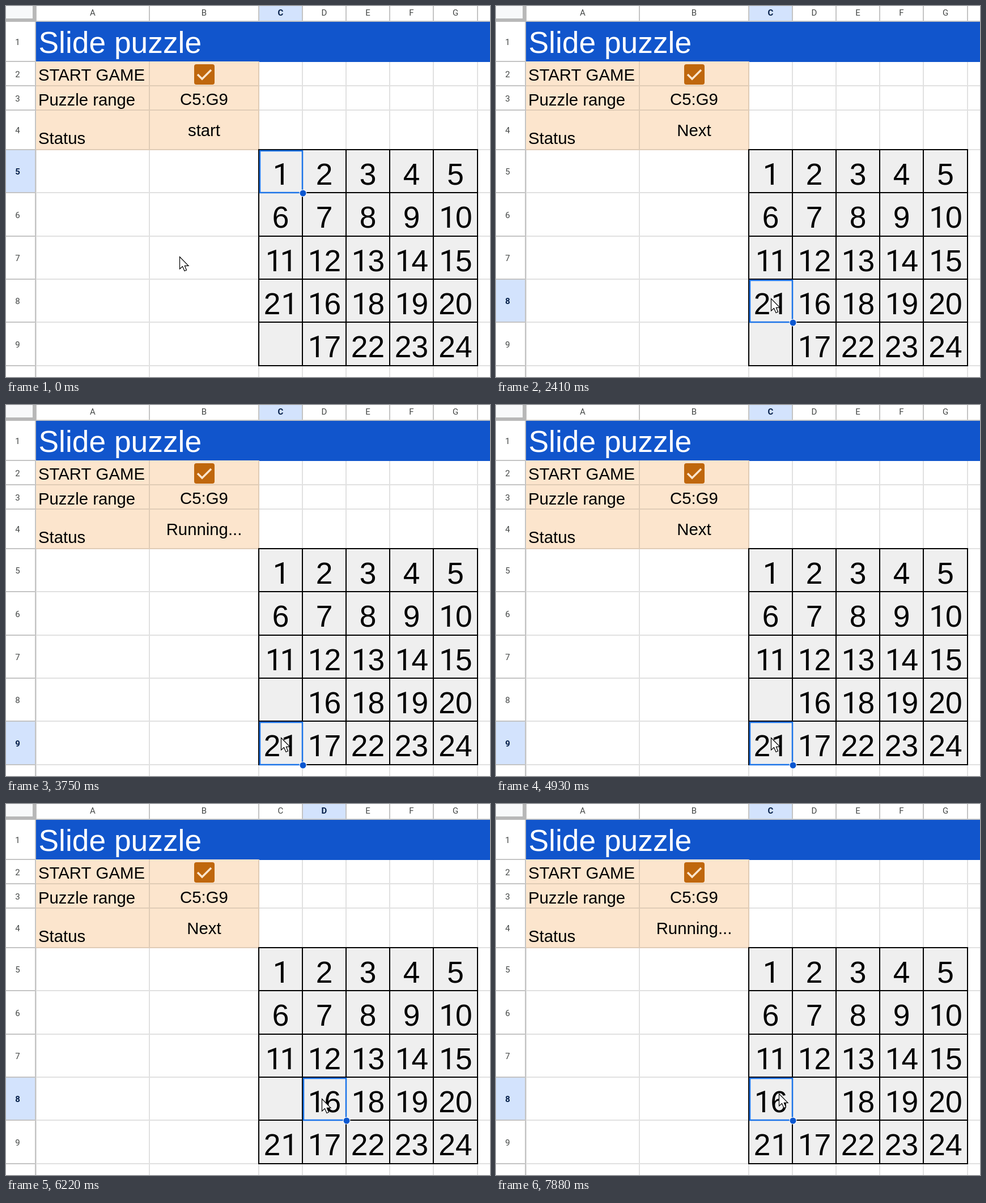
Recreate the animation shown at these times as an HTML page with a canvas. Size 854 px wide and 656 px high, loop 8 s.

```html
<!DOCTYPE html>
<html lang="en">
<head>
<meta charset="utf-8">
<title>Slide puzzle</title>
<style>
  html, body { margin: 0; width: 100%; height: 100%; overflow: hidden; background: #fff; }
  canvas { display: block; }
</style>
</head>
<body>
<canvas width="854" height="656"></canvas>
<script>
const ctx = document.querySelector('canvas').getContext('2d');
const W = 854, H = 656, LOOP = 8000, TICK = 67;
const SANS = '"Liberation Sans", Arial, sans-serif';
const HEAD = 'Roboto, sans-serif';
const colX = [53, 253, 446, 523, 600, 677, 754, 832];
const rowY = [27, 98, 141, 184, 254, 330, 407, 483, 559, 636];
const TILE_COL = 2, TILE_ROW = 4;

const board = [1, 2, 3, 4, 5, 6, 7, 8, 9, 10, 11, 12, 13, 14, 15, 21, 16, 18, 19, 20, 0, 17, 22, 23, 24];
const swaps = [{ at: 3750, a: 15, b: 20 }, { at: 7880, a: 15, b: 16 }];

// Each move ends with a click that selects a cell; the fill handle returns on release.
const home = { x: 306, y: 443, col: 2, row: 4 };
const moves = [
  { start: 130, press: 760, release: 930, x: 485, y: 517, col: 2, row: 7 },
  { start: 2410, press: 2745, release: 2890, x: 485, y: 588, col: 2, row: 8 },
  { start: 4870, press: 5330, release: 5470, x: 557, y: 521, col: 3, row: 7 },
  { start: 6620, press: 6880, release: 7020, x: 499, y: 512, col: 2, row: 7 },
];
const statuses = [
  [0, 'start'], [1880, 'Running...'], [2080, 'Next'], [3220, 'Running...'],
  [4210, 'Next'], [5820, 'Running...'], [6220, 'Next'], [7680, 'Running...'],
];

function rect(color, x1, y1, x2, y2) {
  ctx.fillStyle = color;
  ctx.fillRect(x1, y1, x2 - x1, y2 - y1);
}
const vLine = (color, x, y1, y2) => rect(color, x - 1, y1, x + 1, y2);
const hLine = (color, y, x1, x2) => rect(color, x1, y - 1, x2, y + 1);

function text(str, x, y, font, color = '#000', align = 'left') {
  ctx.font = font;
  ctx.fillStyle = color;
  ctx.textAlign = align;
  ctx.fillText(str, x, y);
}

function disc(color, x, y, r) {
  ctx.fillStyle = color;
  ctx.beginPath();
  ctx.arc(x, y, r, 0, Math.PI * 2);
  ctx.fill();
}

function polyline(points) {
  ctx.beginPath();
  points.forEach(([x, y]) => ctx.lineTo(x, y));
}

function sceneAt(t) {
  const scene = { ...home, handle: true, click: false };
  for (const m of moves) {
    if (t < m.start) break;
    const elapsed = Math.floor((t - m.start) / TICK) * TICK;
    const p = t >= m.press ? 1 : Math.min(1, elapsed / (m.press - m.start));
    const ease = p * p * (3 - 2 * p);
    scene.x += (m.x - scene.x) * ease;
    scene.y += (m.y - scene.y) * ease;
    if (t >= m.press) {
      scene.col = m.col;
      scene.row = m.row;
      scene.click = t < m.release;
      scene.handle = !scene.click;
    }
  }
  scene.status = statuses.findLast(([at]) => t >= at)[1];
  scene.tiles = [...board];
  for (const { at, a, b } of swaps) {
    if (t >= at) [scene.tiles[a], scene.tiles[b]] = [scene.tiles[b], scene.tiles[a]];
  }
  return scene;
}

function drawHeaders({ col, row }) {
  const grey = '#c4c4c4', active = '#d3e3fd';
  rect(active, colX[col], 0, colX[col + 1], 27);
  rect(active, 0, rowY[row], 52, rowY[row + 1]);
  colX.forEach(x => vLine(grey, x, 0, 27));
  hLine(grey, 27, 0, W);
  vLine(grey, 52, 0, H);
  rowY.forEach(y => hLine(grey, y, 0, 52));
  const label = (str, x, y, on) =>
    text(str, x, y, `${on ? 'bold ' : ''}15px ${HEAD}`, on ? '#041e49' : '#444746', 'center');
  [...'ABCDEFG'].forEach((c, i) => label(c, (colX[i] + colX[i + 1]) / 2, 17, i === col));
  for (let i = 0; i < 9; i++) label(i + 1, 20.5, (rowY[i] + rowY[i + 1]) / 2 + 6, i === row);
  rect('#b8b8b8', 0, 0, 53, 28);
  rect('#f8f9fa', 0, 0, 47, 22);
}

function drawSheet(scene) {
  rect('#fff', 0, 0, W, H);
  colX.forEach(x => vLine('#e1e1e1', x, 28, H));
  rowY.forEach(y => hLine('#e1e1e1', y, 53, W));
  drawHeaders(scene);

  rect('#1155cc', 53, 28, W, 99);
  text('Slide puzzle', 57.5, 83, `53.33px ${SANS}`, '#fff');

  rect('#fce5cd', 53, 98, 447, 255);
  rowY.slice(2, 5).forEach(y => hLine('#e0ccb6', y, 53, 447));
  [253, 446].forEach(x => vLine('#e0ccb6', x, 98, 255));
  const font = `29.33px ${SANS}`;
  text('START GAME', 57, 132, font);
  text('Puzzle range', 57, 176, font);
  text('Status', 57, 244, font);
  text('C5:G9', 349.5, 175, font, '#000', 'center');
  text(scene.status, 349.5, 230, font, '#000', 'center');

  ctx.fillStyle = '#bf670d';
  ctx.beginPath();
  ctx.roundRect(332, 103, 36, 36, 4);
  ctx.fill();
  polyline([[338, 121], [346, 129], [362, 113]]);
  ctx.strokeStyle = '#fce5cd';
  ctx.lineWidth = 3.5;
  ctx.stroke();
}

// The digit 1 is set in a face without a foot serif, and a pair of them is kerned.
function drawNumber(n, cx, baseline) {
  const size = 53.33, step = size * (n === 11 ? 0.482 : 0.556);
  const digits = [...String(n)];
  const left = cx - (step * (digits.length - 1) + size * 0.556) / 2;
  digits.forEach((d, i) => {
    const x = left + i * step;
    if (d === '1') text(d, x + 1, baseline, `${size}px ${HEAD}`);
    else text(d, x, baseline, `${size}px ${SANS}`);
  });
}

function drawBoard(tiles) {
  rect('#efefef', 446, 254, 832, 636);
  colX.slice(TILE_COL).forEach(x => vLine('#000', x, 253, 637));
  rowY.slice(TILE_ROW).forEach(y => hLine('#000', y, 445, 833));
  tiles.forEach((n, i) => {
    const c = TILE_COL + i % 5, r = TILE_ROW + Math.floor(i / 5);
    if (n) drawNumber(n, (colX[c] + colX[c + 1]) / 2, rowY[r] + 62);
  });
}

function drawSelection({ col, row, handle }) {
  const x = colX[col], y = rowY[row];
  const right = colX[col + 1], bottom = rowY[row + 1];
  ctx.strokeStyle = '#1a73e8';
  ctx.lineWidth = handle ? 2.5 : 2;
  ctx.strokeRect(x + 2, y + 2, right - x - 2, bottom - y - 2);
  if (handle) {
    disc('#fff', right + 1, bottom + 1, 6.5);
    disc('#0b57d0', right + 1, bottom + 1, 5.5);
  }
}

function drawCursor({ x, y, click }) {
  if (click) disc('rgba(250, 244, 0, 0.55)', x, y, 17);
  polyline([[0, 0], [0, 21.5], [5, 17], [8.5, 25], [12, 23.5], [8.8, 15.8], [15.5, 15.8]]
    .map(([dx, dy]) => [x + 0.5 + dx, y + 0.5 + dy]));
  ctx.closePath();
  ctx.fillStyle = '#fff';
  ctx.fill();
  ctx.strokeStyle = '#000';
  ctx.lineWidth = 1.2;
  ctx.stroke();
}

let origin;
function frame(now) {
  origin ??= now;
  const scene = sceneAt((now - origin) % LOOP);
  drawSheet(scene);
  drawBoard(scene.tiles);
  drawSelection(scene);
  drawCursor(scene);
  requestAnimationFrame(frame);
}
requestAnimationFrame(frame);
</script>
</body>
</html>
```
